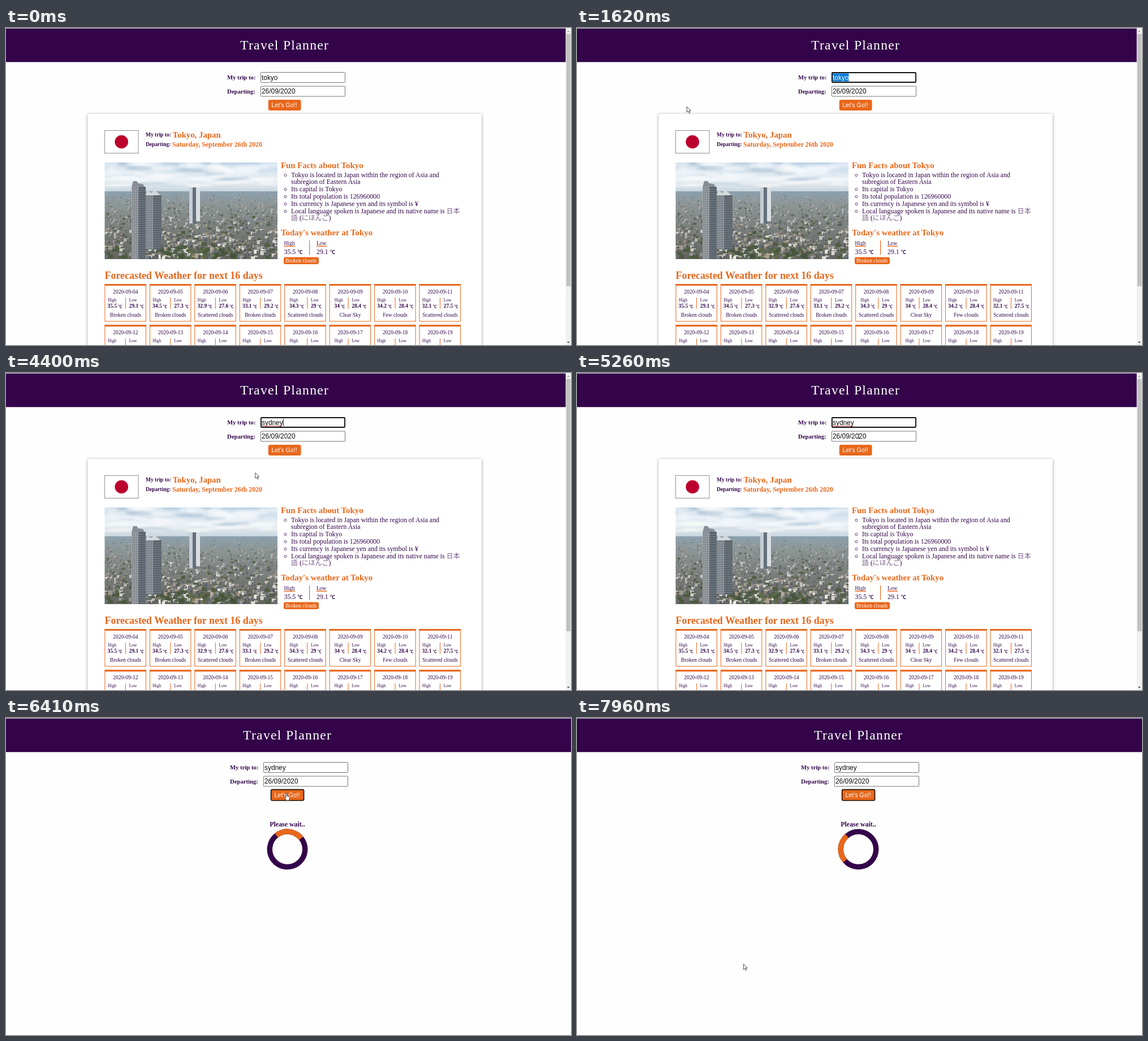
An HTML page for the animation above (8000 ms loop, 999x561 px).

```html
<!DOCTYPE html>
<html lang="en">
<head>
<meta charset="utf-8">
<title>Travel Planner</title>
<style>
  html, body { margin: 0; width: 100%; height: 100%; overflow: hidden; background: #fefefe; }
  svg { display: block; }
  text { font-family: "Liberation Serif", "Noto Sans CJK JP", serif; fill: #33074a; white-space: pre; }
  .sans { font-family: "Liberation Sans", Arial, sans-serif; fill: #111; }
  .cjk { font-family: "Noto Sans CJK JP Light", "Noto Sans CJK JP", "Noto Sans CJK SC", sans-serif; font-weight: 300; fill-opacity: .65; }
  .unit { font-family: "Noto Sans CJK JP", "Noto Sans CJK SC", sans-serif; font-weight: bold; }
  .b { font-weight: bold; }
  .o { fill: #e8671b; }
  .w { fill: #fff; }
  .mid { text-anchor: middle; }
</style>
</head>
<body>
<svg id="stage" width="999" height="561" viewBox="0 0 999 561"></svg>
<script>
const LOOP = 8000, ORANGE = '#e8671b', PURPLE = '#330449';
const EM = 11.9;

const text = (x, y, size, str, cls = '', extra = '') =>
  `<text x="${x}" y="${y}" font-size="${size}" class="${cls}" ${extra}>${str}</text>`;
const rect = (x, y, w, h, fill, extra = '') =>
  `<rect x="${x}" y="${y}" width="${w}" height="${h}" fill="${fill}" ${extra}/>`;
const poly = (points, fill, extra = '') => `<polygon points="${points}" fill="${fill}" ${extra}/>`;
const celsius = (x, y, size) => text(x, y, size, '℃', 'unit');

function random(seed) {
  return () => (seed = (seed * 16807) % 2147483647) / 2147483647;
}

function tower(x, y, w, h, light, dark) {
  let out = rect(x, y, w * .5, h, light) + rect(x + w * .5, y, w * .5, h, dark);
  for (let i = 2; i < w; i += 3) out += rect(x + i, y + 1, 1, h, '#3f4853', 'opacity=".5"');
  for (let j = 4; j < h; j += 4) out += rect(x, y + j, w, .7, '#d0d3d5', 'opacity=".35"');
  return out;
}

function photo() {
  const rnd = random(77);
  const tones = ['#e4e0d8', '#c4bfb6', '#9b9a96', '#707478', '#b3a493', '#f4f2ee', '#8a7f74'];
  let out = rect(174, 238, 306, 60, 'url(#sky)');
  for (let i = 0; i < 60; i++) {
    const depth = rnd(), fill = rnd() < .75 ? '#fbfcfd' : '#a9bfd2';
    out += `<ellipse cx="${174 + rnd() * 306}" cy="${239 + depth * 40}" rx="${10 + rnd() * 26}" ry="${5 - depth * 3}" fill="${fill}" opacity=".55" filter="url(#soft)"/>`;
  }
  out += rect(174, 289, 306, 120, 'url(#city)');
  for (let i = 0; i < 1100; i++) {
    const depth = i / 1100, size = 1.2 + depth * 6;
    const x = 170 + rnd() * 310, y = 291 + depth * 116;
    const w = size * (.7 + rnd()), h = size * (.4 + rnd() * .8);
    const green = rnd() < .1 + depth * .15;
    const fill = green ? '#4a5a3c' : tones[Math.floor(rnd() * tones.length)];
    const alpha = `opacity="${(.4 + depth * .55).toFixed(2)}"`;
    out += rect(x.toFixed(1), (y - h / 2).toFixed(1), w.toFixed(1), h.toFixed(1), fill, alpha);
    if (!green) out += rect((x + w * .6).toFixed(1), (y - h / 4).toFixed(1), (w * .4).toFixed(1), h.toFixed(1), '#50565b', alpha);
  }
  for (let i = 0; i < 60; i++) {
    out += `<circle cx="${275 + rnd() * 130}" cy="${390 + rnd() * 19}" r="${2 + rnd() * 3}" fill="${rnd() < .5 ? '#435238' : '#5f6b4b'}" opacity=".7"/>`;
  }
  out += rect(324, 280, 7, 66, '#c6ced5') + rect(330, 280, 6, 66, '#64707c') +
    rect(336, 280, 7, 62, '#d9dfe3') + rect(324, 279, 19, 3, '#eef1f3');
  out += poly('246,298 250,288 257,292 262,287 269,292 274,298', '#d4d9dc') + tower(246, 296, 29, 96, '#8b9298', '#626a73');
  out += poly('222,282 225,271 231,271 234,275 242,276 246,283', '#868e96') + tower(222, 281, 25, 128, '#9b9fa3', '#5f6872');
  return `<g clip-path="url(#photoClip)">${out}</g>`;
}

function forecastCard(x, y, date, high, low, sky) {
  // Shorter readings keep the pair of columns centred
  const pad = v => (4 - v.length) * 1.78;
  const left = x + 5.2 + pad(high) + pad(low);
  const line = x + 36.5 - pad(high) + pad(low);
  const right = line + 6.8;
  const value = (vx, v) => text(vx, y + 42.3, 9.5, v, 'b') +
    celsius(vx + 19 - pad(v) * 2, y + 41.8, 6.8);
  return rect(x + .5, y + .5, 72.5, 65.5, '#fff', `stroke="${ORANGE}"`) + rect(x, y, 73.5, 3, ORANGE) +
    text(x + 37, y + 16.6, 9.5, date, 'mid') +
    text(left + .3, y + 30.5, 7.5, 'High') + text(right, y + 30.5, 7.5, 'Low') +
    rect(line, y + 24, 1, 20, ORANGE) +
    value(left, high) + value(right, low) +
    text(x + 37, y + 58, 9.5, sky, 'mid');
}

function forecast() {
  const days = [
    ['35.5', '29.1', 'Broken clouds'], ['34.5', '27.3', 'Broken clouds'],
    ['32.9', '27.6', 'Scattered clouds'], ['33.1', '29.2', 'Broken clouds'],
    ['34.3', '29', 'Scattered clouds'], ['34', '28.4', 'Clear Sky'],
    ['34.2', '28.4', 'Few clouds'], ['32.1', '27.5', 'Scattered clouds']
  ];
  let out = '';
  for (let i = 0; i < 16; i++) {
    const date = '2020-09-' + String(i + 4).padStart(2, '0');
    out += forecastCard(174.4 + (i % 8) * 79.45, i < 8 ? 453 : 525.4, date, ...days[i % 8]);
  }
  return out;
}

function facts() {
  const lines = [
    [264, 'Tokyo is located in Japan within the region of Asia and', 1],
    [275.5, 'subregion of Eastern Asia'],
    [289, 'Its capital is Tokyo', 1],
    [302, 'Its total population is 126960000', 1],
    [315, 'Its currency is Japanese yen and its symbol is ¥', 1],
    [328, 'Local language spoken is Japanese and its native name is <tspan class="cjk">日本</tspan>', 1],
    [340, '<tspan class="cjk">語</tspan> (<tspan class="cjk">にほんご</tspan>)']
  ];
  return lines.map(([y, str, bullet]) => text(504, y, EM, str) +
    (bullet ? `<circle cx="494" cy="${y - 3.5}" r="2.1" fill="none" stroke="${PURPLE}" stroke-width=".75"/>` : '')).join('');
}

function todayWeather() {
  const column = (x, label, value, w) => text(x, 384, 9.5, label) + rect(x, 385.3, w, 1.5, ORANGE) +
    text(x, 400, EM, value) + celsius(x + 24, 400, 9);
  return text(486, 367, 14.85, "Today's weather at Tokyo", 'b o') +
    column(491.5, 'High', '35.5', 19.5) + column(549, 'Low', '29.1', 18) +
    rect(536, 376, 1.2, 25.5, ORANGE) +
    rect(491, 405.5, 62, 12.5, ORANGE, 'rx="3"') + text(494, 415, 9.5, 'Broken clouds', 'w');
}

const results = () =>
  rect(144.5, 152, 696.5, 440, '#fff', 'filter="url(#shadow)"') +
  rect(174.5, 181.5, 59.5, 40, '#fff', 'stroke="#8f8f8f"') +
  '<circle cx="204.2" cy="201.5" r="11.8" fill="#bc002d"/>' +
  text(247, 192, 9.5, 'My trip to:', 'b') + text(294.5, 194, 14.85, 'Tokyo, Japan', 'b o') +
  text(247, 209, 9.5, 'Departing:', 'b') + text(294, 210, EM, 'Saturday, September 26th 2020', 'b o') +
  photo() + text(486, 248, 14.85, 'Fun Facts about Tokyo', 'b o') + facts() + todayWeather() +
  text(174.5, 444.4, 17.95, 'Forecasted Weather for next 16 days', 'b o') + forecast();

const scrollbar = () =>
  rect(989.6, 0, 9.4, 561, '#f1f1f1') + rect(990.7, 10.5, 7.5, 446.5, '#c1c1c1') +
  poly('992,7 994.3,4.2 996.6,7', '#a3a3a3') + poly('992,555 996.6,555 994.3,558', '#505050');

const field = y => rect(450.5, y + .5, 149, 18, '#fff', 'stroke="#767676" rx="1"');

const form = () =>
  text(414, 38, 23.8, 'Travel Planner', 'w', 'letter-spacing="1.24"') +
  text(391, 91.3, 10.7, 'My trip to:', 'b') + text(391, 116, 10.7, 'Departing:', 'b') +
  field(78) + field(102.5) +
  rect(450.9, 79, 148.2, 17, '#fff', 'id="focus" stroke="#101010" stroke-width="1.9" rx="1.5"') +
  text(452, 91.6, EM, '', 'sans', 'id="query"') +
  rect(452, 80.5, 0, 14, '#0078d7', 'id="marked"') +
  `<g clip-path="url(#markClip)">${text(452, 91.6, EM, 'tokyo', 'sans w', 'id="markedText" style="fill:#fff"')}</g>` +
  `<path id="squiggle" d="M452 93.8 ${'q1 -1.4 2 0t2 0'.repeat(9)}" fill="none" stroke="#e33" stroke-width=".9"/>` +
  rect(0, 81, 1, 13, '#111', 'id="caret"') +
  text(452, 116, EM, '26/09/2020', 'sans') +
  rect(463.8, 127, 57.8, 19, ORANGE, 'rx="3"') +
  rect(463.6, 126.6, 58, 19.4, 'none', 'id="buttonFocus" rx="2.5" stroke="#161008" stroke-width="1.6"') +
  text(469.4, 139.8, 10.7, "Let's Go!!", 'sans', 'style="fill:#fff"') +
  `<g id="suggest">${rect(450, 98, 150.5, 30.5, '#fff', 'filter="url(#drop)"')}${
    text(457, 116, 7.6, 'sydney', '', 'style="font-family:\'Open Sans\',sans-serif;font-weight:600;fill:#333"')}</g>`;

const spinner = () => {
  const ring = 2 * Math.PI * 31.2;
  const circle = (color, extra) => `<circle r="31.2" fill="none" stroke="${color}" stroke-width="9.4" ${extra}/>`;
  return text(497.5, 192, EM, 'Please wait..', 'b mid') +
    `<g id="spin">${circle(PURPLE, '')}${circle(ORANGE, `stroke-dasharray="${ring / 4} ${ring}" transform="rotate(-135)"`)}</g>`;
};

const pointers = () =>
  '<circle id="halo" fill="#f2e72c" opacity=".8"/><g id="pointer">' +
  '<path id="arrow" d="M.3 .3V10L2.6 8 4.2 11.6 5.8 10.9 4.2 7.4H7.2Z" fill="#fff" stroke="#222" stroke-width=".8"/>' +
  '<path id="beam" d="M-2 -4.2H-.6L0 -3.6 .6 -4.2H2M0 -3.6V3.8M-2 4.4H-.6L0 3.8 .6 4.4H2" fill="none" stroke="#444" stroke-width=".8"/>' +
  '<path id="hand" d="M-1 1Q0 -.8 1.1 1V5L5 6.2Q6 6.7 5.6 8.4L4.6 11.5V13H-.6V11.7L-3.4 8Q-3.4 6.6 -1 8Z" fill="#fff" stroke="#222" stroke-width=".8"/></g>';

document.getElementById('stage').innerHTML = `<defs>
  <linearGradient id="sky" x2="0" y2="1"><stop stop-color="#bcd3e6"/><stop offset=".5" stop-color="#edf2f5"/><stop offset="1" stop-color="#b9cad6"/></linearGradient>
  <linearGradient id="city" x2="0" y2="1"><stop stop-color="#8da1ae"/><stop offset=".2" stop-color="#8d9596"/><stop offset="1" stop-color="#63645d"/></linearGradient>
  <filter id="soft"><feGaussianBlur stdDeviation="2"/></filter>
  <filter id="shadow" x="-5%" y="-5%" width="110%" height="110%"><feDropShadow dx="0" dy="1" stdDeviation="2.8" flood-opacity=".42"/></filter>
  <filter id="drop" x="-10%" y="-20%" width="120%" height="150%"><feDropShadow dx="0" dy=".8" stdDeviation="1" flood-opacity=".4"/></filter>
  <clipPath id="photoClip"><rect x="174.5" y="238" width="305.5" height="171"/></clipPath>
  <clipPath id="markClip"><rect id="markBox" y="79" height="17"/></clipPath></defs>` +
  rect(0, 0, 999, 561, '#fefefe') + rect(0, 0, 999, 1, '#c9c3cd') + rect(0, 1, 999, 59.3, PURPLE) +
  `<g id="results">${results()}</g><g id="waiting">${spinner()}</g><g id="form">${form()}</g>` +
  `<g id="bar">${scrollbar()}</g>${pointers()}`;

const el = Object.fromEntries([...document.querySelectorAll('[id]')].map(n => [n.id, n]));
const show = (node, on) => node.setAttribute('visibility', on ? 'inherit' : 'hidden');
const between = (t, a, b) => t >= a && t < b;

// Pointer path: time, x, y
const path = [
  [290, 889, 470], [520, 760, 330], [800, 570, 150], [1050, 509, 94], [1140, 509, 94], [1370, 383, 95],
  [1520, 383, 95], [1600, 194, 139], [4080, 194, 139], [4395, 440, 176], [4550, 468, 191], [4850, 496, 134],
  [5000, 496, 134], [5250, 498, 112], [5700, 497, 121], [6000, 496, 133], [6600, 496, 133],
  [7000, 330, 290], [7400, 244, 400], [7700, 294, 435], [8000, 294, 435]
];

function pointerAt(t) {
  const i = path.findIndex(p => p[0] > t);
  if (i < 1) return path[i ? path.length - 1 : 0].slice(1);
  const [a, b] = [path[i - 1], path[i]];
  const k = (t - a[0]) / (b[0] - a[0]);
  return [a[1] + (b[1] - a[1]) * k, a[2] + (b[2] - a[2]) * k];
}

const typing = [[0, 'tokyo'], [2550, 's'], [2780, 'sy'], [2930, 'syd'], [3010, 'sydn'], [3090, 'sydne'], [3160, 'sydney']];

function render(t) {
  // The screen refreshes about thirteen times a second
  const tick = 290 + Math.floor((t - 280) / 77.5) * 77.5;
  const loading = t >= 6410;
  const [x, y] = pointerAt(tick);

  show(el.results, !loading);
  show(el.bar, !loading);
  show(el.waiting, loading);
  el.form.setAttribute('transform', `translate(${loading ? 5 : 0})`);
  el.spin.setAttribute('transform', `translate(497.5 232.3) rotate(${6.5 + (tick - 6412.5) * .1726})`);

  const query = typing.filter(k => k[0] <= t).pop()[1];
  el.query.textContent = query;
  const focused = between(t, 1080, 5400);
  const end = 452 + el.query.getComputedTextLength();
  const start = Math.min(end, Math.max(452, x));
  const marking = between(t, 1160, 2550) && start < end;
  show(el.focus, focused);
  show(el.marked, marking);
  show(el.markedText, marking);
  for (const box of [el.marked, el.markBox]) {
    box.setAttribute('x', start);
    box.setAttribute('width', end - start);
  }
  const blinkOff = t > 3180 && Math.floor((t - 3180) / 530) % 2;
  show(el.caret, focused && !marking && !blinkOff);
  el.caret.setAttribute('x', end);
  show(el.squiggle, focused && t >= 3160);
  show(el.suggest, between(t, 2550, 3160));
  el.suggest.setAttribute('opacity', t < 2630 ? .6 : 1);
  show(el.buttonFocus, t >= 6260);

  const dragging = between(t, 1080, 1540);
  const overField = between(x, 450, 600) && (between(y, 78, 97) || between(y, 102, 122));
  const overButton = between(x, 464, 522) && between(y, 127, 146);
  const kind = dragging || overField ? 'beam' : overButton ? 'hand' : 'arrow';
  show(el.pointer, t >= 290);
  el.pointer.setAttribute('transform', `translate(${x} ${y})`);
  for (const name of ['arrow', 'beam', 'hand']) show(el[name], t >= 290 && name === kind);

  const pressed = between(t, 6260, 6410);
  show(el.halo, between(t, 1080, 1460) || between(t, 5400, 5560) || pressed);
  el.halo.setAttribute('cx', x - 1);
  el.halo.setAttribute('cy', pressed ? y + 1.5 : y);
  el.halo.setAttribute('r', pressed ? 7.5 : 6.5);
}

const begin = performance.now();
function frame() {
  render((performance.now() - begin) % LOOP);
  requestAnimationFrame(frame);
}
frame();
</script>
</body>
</html>
```
